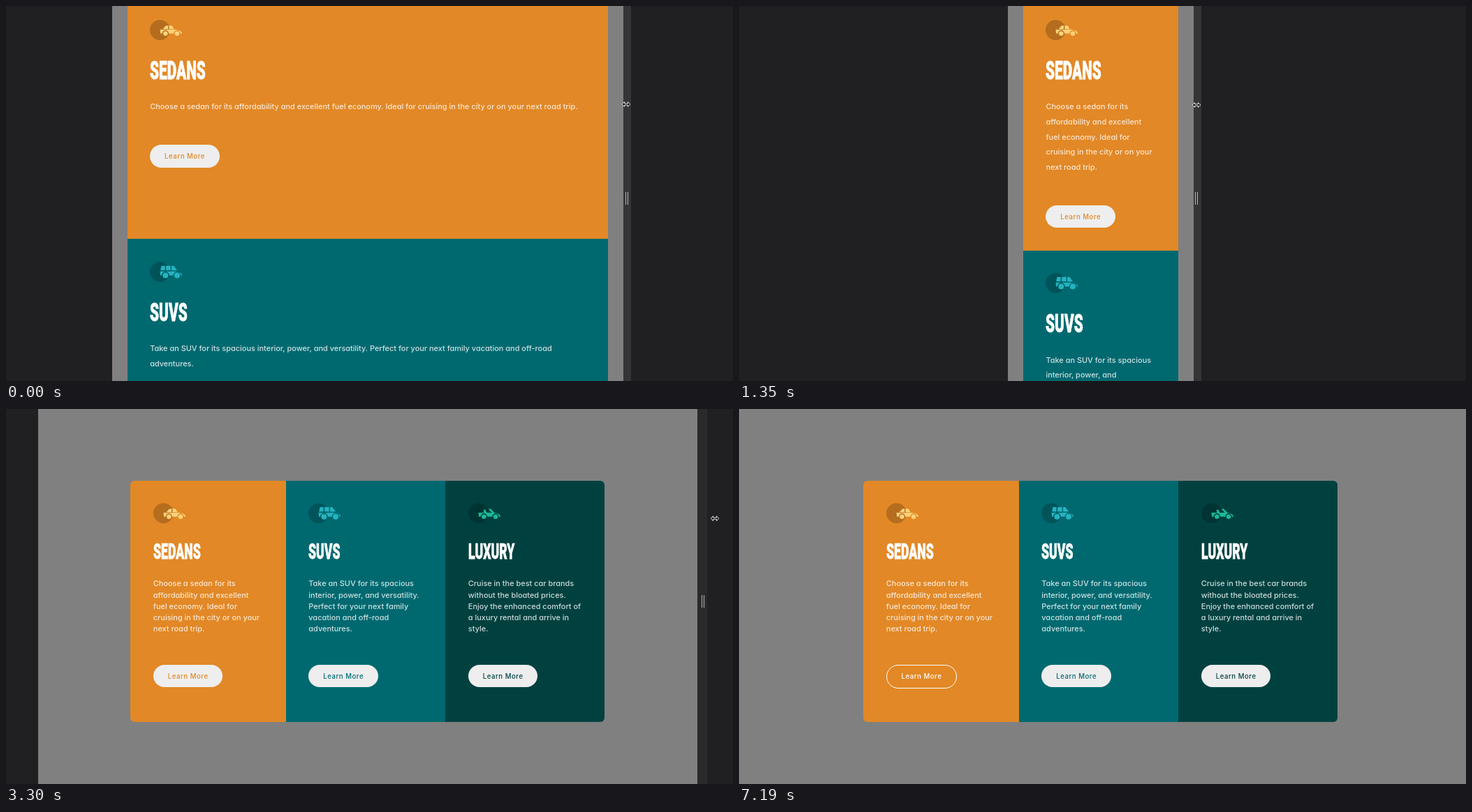
An HTML page for the animation above (7.5 s loop, 1041 by 538 pixels).

```html
<!DOCTYPE html>
<html lang="en">
<head>
<meta charset="utf-8">
<title>Responsive cards</title>
<style>
  html, body { margin: 0; width: 100%; height: 100%; overflow: hidden; background: #202022; }
  #stage { position: absolute; left: 0; top: 0; width: 1041px; height: 538px; overflow: hidden; font-family: Inter, "Open Sans", sans-serif; }
  #stage > * { position: absolute; }
  #strip { top: 0; width: 14px; height: 538px; }
  #strip::before { content: ""; position: absolute; left: 5.5px; top: 266.5px; width: 2px; height: 18.5px; border: solid #b8b8ba; border-width: 0 1px; }
  #page { top: 0; height: 538px; background: #808080; }
  .card { position: relative; box-sizing: border-box; min-height: 346.67px; padding: 146.7px 32.5px 32.5px; background: var(--c); }
  .card svg { position: absolute; left: 32.5px; top: 32.5px; width: 46.2px; height: 28.9px; overflow: visible; }
  h2 { position: absolute; left: 32.5px; top: 86.5px; margin: 0; color: #fff; white-space: nowrap; -webkit-text-stroke: .025em #fff;
    font: 900 37.2px/1 Roboto, "Liberation Sans", sans-serif; transform: scaleX(.56); transform-origin: 0 0; }
  p { margin: 0; padding-right: 1px; font-size: 10.95px; font-weight: 500; line-height: 21.67px; color: rgba(255,255,255,.8); font-feature-settings: "cv11"; }
  .btn { display: flex; align-items: center; justify-content: center; box-sizing: border-box; width: 99.7px; height: 32.5px; margin-top: 43.33px;
    border-radius: 18px; background: #eee; color: var(--c); font-size: 9.63px; font-weight: 500; letter-spacing: .52px; white-space: nowrap; }
  .btn.on { width: 101.2px; height: 34px; border: 1px solid #fff; background: none; color: #fff; }
  #cards.wide { display: flex; border-radius: 6px; overflow: hidden; }
  .wide .card { flex: none; width: var(--w); height: 346.67px; padding-top: 139.8px; }
  .wide h2 { font-size: 31.6px; }
  .wide p { line-height: 16.25px; white-space: pre; }
  #dot { width: 14px; height: 14px; margin: -7px; border-radius: 50%; background: rgba(90,90,90,.75); }
  #arrow { width: 14px; height: 10px; margin: -5px -7px; overflow: visible; }
</style>
</head>
<body>
<div id="stage">
  <div id="strip"></div>
  <div id="page"></div>
  <div id="cards"></div>
  <svg id="arrow" viewBox="-7 -5 14 10"><path d="M-5.8 0l3.4-3.4v2.3h4.8v-2.3l3.4 3.4-3.4 3.4V1.1h-4.8v2.3z" fill="#111" stroke="#fff" stroke-width=".9"/></svg>
  <div id="dot"></div>
</div>
<script>
const $ = id => document.getElementById(id);

const cars = [
  { name: 'SEDANS', color: '#e28826', tint: '#ffd27a', width: 222.5, arch: 6.5,
    text: 'Choose a sedan for its\naffordability and excellent\nfuel economy. Ideal for\ncruising in the city or on your\nnext road trip.',
    cabin: 'M26 18l4-5q2-2 5-2h1v7zM38 11h4q2 0 3 2l3 5H38z' },
  { name: 'SUVS', color: '#006970', tint: '#25b3c0', width: 228.5, arch: 7.5,
    text: 'Take an SUV for its spacious\ninterior, power, and versatility.\nPerfect for your next family\nvacation and off-road\nadventures.',
    cabin: 'M23 8l-2 9h9V8zM32 8v9h9V8zM43 8v9h11l-5-7q-1-2-3-2z' },
  { name: 'LUXURY', color: '#004140', tint: '#1db898', width: 227.7, arch: 6.5,
    text: 'Cruise in the best car brands\nwithout the bloated prices.\nEnjoy the enhanced comfort of\na luxury rental and arrive in\nstyle.',
    cabin: 'M30 13h4l3 7-6-1zM40 12l4-1 9 9h-5z' }
];

// Car body with a round arch cut out above each wheel
function drawCar({ arch: r, cabin, tint }) {
  const axles = [54, 31];
  const arches = axles.map(x => `H${x + r}a${r} ${r} 0 0 0 ${-2 * r} 0`).join('');
  const wheels = axles.map(x => `<circle cx="${x}" cy="27" r="${r - 2}"/>`).join('');
  return `<svg viewBox="0 0 64 40"><circle cx="20" cy="20" r="20" opacity=".2"/>
    <g fill="${tint}"><path d="M20 19h30q13 1 14 8${arches}H21z${cabin}"/>${wheels}</g></svg>`;
}

$('cards').innerHTML = cars.map(c => `<div class="card" style="--c:${c.color};--w:${c.width}px">${drawCar(c)}
  <h2>${c.name}</h2><p>${c.text}</p><div class="btn">Learn More</div></div>`).join('');
const buttons = [...document.querySelectorAll('.btn')];

const CENTER = 518, MARGIN = 21.67, BREAKPOINT = 370;
const TURN = 1650, FULL = 3750, TOUCH = 4200, END = 7190;

// time, half page width
const drag = [[0, 366], [900, 205.5], [1350, 132.75], [TURN, 118], [2250, 187], [3300, 472], [FULL, 540]];
// time, x, y
const touch = [[TOUCH, 1000, 174], [4800, 693, 386], [5850, 270, 390], [6150, 270, 390], [7050, 1015, 531]];

function at(keys, t) {
  const i = keys.findIndex(k => k[0] > t);
  if (i < 1) return keys.at(i).slice(1);
  const a = keys[i - 1], b = keys[i], f = (t - a[0]) / (b[0] - a[0]);
  return a.slice(1).map((v, n) => v + (b[n + 1] - v) * f);
}

function tapped(t) {
  return t >= 6150 ? 0 : t >= 5400 ? 1 : t >= 4950 ? 2 : -1;
}

function place(el, x, y, w) {
  el.style.left = x + 'px';
  el.style.top = y + 'px';
  if (w) el.style.width = w + 'px';
}

function show(el, on) {
  el.style.display = on ? '' : 'none';
}

function draw(t) {
  const [half] = at(drag, t);
  const growing = t > TURN, wide = half > BREAKPOINT;
  const strip = CENTER + half - (growing ? 0 : 3);

  place($('page'), CENTER - half, 0, half * 2);
  place($('strip'), strip, 0);
  $('strip').style.background = growing ? '#2a2a2d' : '#353538';
  $('cards').className = wide ? 'wide' : '';
  if (wide) place($('cards'), 178.3, 102.5, 678.7);
  else place($('cards'), CENTER - half + MARGIN, -12.5, 2 * (half - MARGIN));

  // The pointer runs ahead of the handle while the page grows
  place($('arrow'), strip + (growing ? 25 : 7), 141 + 16 * (t / 3300) ** 3);
  show($('arrow'), t < FULL);
  place($('dot'), ...at(touch, t));
  show($('dot'), t >= TOUCH && t < END);
  buttons.forEach((b, i) => b.classList.toggle('on', i === tapped(t)));
}

function tick() {
  const t = performance.now() % 7500;
  draw(t >= END ? END : Math.floor(t / 150) * 150);
  requestAnimationFrame(tick);
}
tick();
</script>
</body>
</html>
```
